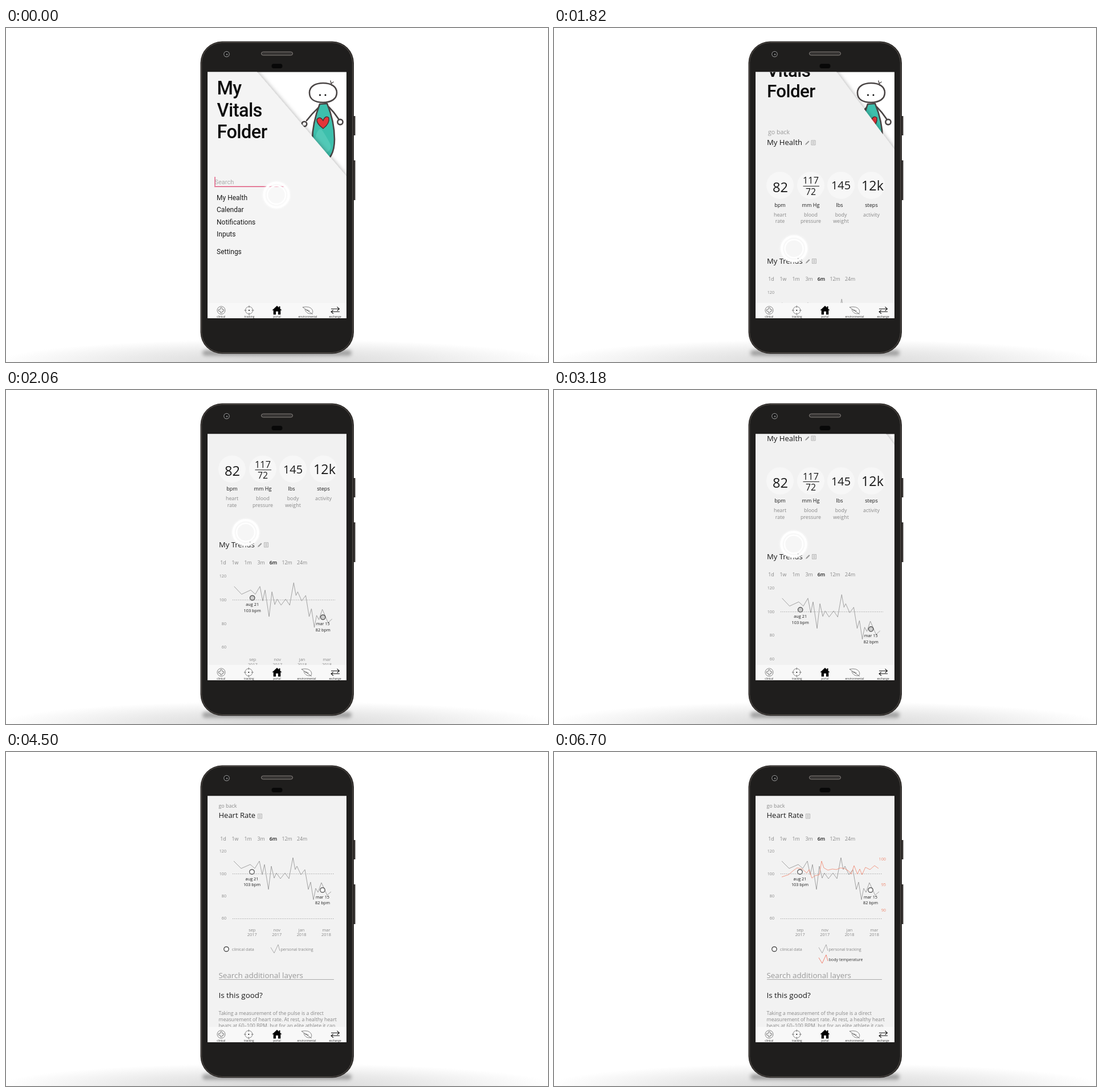
These frames come from a looping animation (952x588 px, 8000 ms). An HTML page:

```html
<!DOCTYPE html>
<html lang="en">
<head>
<meta charset="utf-8">
<title>Health app demo</title>
<style>
  html, body { margin: 0; width: 100%; height: 100%; overflow: hidden; background: #fff; }
  svg { display: block; width: 952px; height: 588px; font-family: "Open Sans", "Noto Sans", sans-serif; }
  .din { font-family: Roboto, sans-serif; }
  .line { fill: none; stroke: #8d8d8d; stroke-width: .8; }
  .icon { fill: none; stroke: #555; stroke-width: .7; }
  .ink { fill: none; stroke: #4a4545; stroke-width: 2.6; stroke-linecap: round; stroke-linejoin: round; }
  .dots { stroke: #888; stroke-width: .8; stroke-dasharray: 1.3 1.9; }
</style>
</head>
<body>
<svg viewBox="0 0 952 588">
  <defs>
    <clipPath id="screen"><rect x="354" y="77.500" width="244" height="433.500"/></clipPath>
    <filter id="fold" x="-20%" y="-20%" width="140%" height="140%">
      <feDropShadow dx="1.500" dy="-1" stdDeviation="3" flood-opacity=".25"/>
    </filter>
    <filter id="soft" x="-30%" y="-200%" width="160%" height="500%"><feGaussianBlur stdDeviation="3"/></filter>
    <filter id="glow" x="-30%" y="-30%" width="160%" height="160%"><feGaussianBlur stdDeviation="1.5"/></filter>
    <radialGradient id="floor">
      <stop offset="0" stop-color="#bbb"/><stop offset=".55" stop-color="#ddd"/><stop offset="1" stop-color="#fff"/>
    </radialGradient>
  </defs>

  <ellipse cx="476" cy="588" rx="490" ry="40" fill="url(#floor)" opacity=".6"/>
  <rect x="345" y="567" width="262" height="10" rx="5" fill="#666" opacity=".55" filter="url(#soft)"/>

  <g id="phone">
    <path d="M611 155h2.500v34H611zM611 233h2.500v70H611z" fill="#35312f"/>
    <rect x="341.500" y="23.500" width="269.500" height="550" rx="38" fill="#2b2826"/>
    <rect x="343.500" y="25.500" width="265" height="546" rx="36" fill="#1f1e1d" stroke="#55504c"/>
    <circle cx="387.500" cy="46" r="4.700" fill="#111" stroke="#8a8a8a" stroke-width="1.200"/>
    <circle cx="388" cy="46.500" r="1.800" fill="#666"/>
    <rect x="448.500" y="42" width="55" height="6" rx="3" fill="#353332" stroke="#85807c"/>
    <rect x="466.500" y="63" width="19" height="8" rx="4" fill="#080808"/>
  </g>

  <g clip-path="url(#screen)">
    <rect x="354" y="77" width="244" height="435" fill="#fff"/>
    <g id="figure">
      <path class="ink" d="M549 140Q537 151 528 163M567 139Q577 149 584 160M555 233L557 258M565 232L567 255"/>
      <circle class="ink" cx="524" cy="169" r="4.300"/>
      <circle class="ink" cx="587" cy="165.500" r="4.600"/>
      <circle class="ink" cx="556" cy="262" r="4"/>
      <ellipse class="ink" cx="568.500" cy="260.500" rx="5" ry="4.300"/>
      <path class="ink" style="fill:#3dbfac" d="M551 134C543 155 538 175 538 198C538 222 547 234 557 234C568 234 577 220 577 196C577 172 571 150 564 133Z"/>
      <path d="M544 190Q550 172 556 181T569 203T553 224T544 190" fill="#62d0bf" opacity=".6"/>
      <path d="M557 177Q545 168 546 161Q551 154 557 163Q561 153 567 158Q569 168 557 177Z" fill="#e5343a" stroke="#4a3535" stroke-width="1.500"/>
      <path class="ink" style="fill:#fff" d="M533 114C533 103 543 97 557 97S581 103 581 114S571 131 557 131S533 126 533 114Z"/>
      <path class="ink" style="stroke-width:1.400" d="M572 101L570 93M571 98L575 95"/>
      <circle cx="551.500" cy="118" r="1.500"/><circle cx="561" cy="118" r="1.500"/>
    </g>
    <g id="menu"></g>
    <g id="health"></g>
    <g id="heartRate"></g>
    <g id="nav"></g>
    <g id="touch">
      <circle r="22" fill="none" stroke="#fff" stroke-width="5" opacity=".7" filter="url(#glow)"/>
      <circle r="21.500" fill="#fff" fill-opacity=".35" stroke="#fff" stroke-width="3.800"/>
      <circle r="16" fill="none" stroke="#fff" stroke-width="2.500"/>
    </g>
  </g>
</svg>

<script>
const $ = id => document.getElementById(id);
const GREY = '#888', DARK = '#1a1a1a';

const text = (x, y, label, size, fill = DARK, extra = '') =>
  `<text x="${x}" y="${y}" font-size="${size}" fill="${fill}" ${extra}>${label}</text>`;
const centred = (x, y, label, size, fill = DARK, extra = '') =>
  text(x, y, label, size, fill, `text-anchor="middle" ${extra}`);
const title = (x, y, step, size) => ['My', 'Vitals', 'Folder'].map((word, i) =>
  text(x, y + i * step, word, size, '#0d0d0d', 'class="din" font-weight="500" letter-spacing="-.6"')).join('');
const pencil = (x, y) => `<path d="M${x} ${y + 4}l1-2.500 5-5 1.500 1.500-5 5z" fill="#999"/>`;
const list = (x, y) => `<path class="icon" style="stroke:#999" d="M${x} ${y - 4}h7v8h-7zM${x + 1.5} ${y - 2}h4m-4 2h4m-4 2h4"/>`;
const tabs = y => ['1d', '1w', '1m', '3m', '6m', '12m', '24m'].map((label, i) =>
  centred([381.5, 402.5, 425, 448, 469.5, 493.5, 520][i], y, label, 8.8,
    label === '6m' ? DARK : GREY, label === '6m' ? 'font-weight="600"' : '')).join('');

const pulse = '400,192 413,205 429,198 437,205 445,192 450,216 454,198 461,242 466,201 471,222 475,213 482,223 490,213 497,223 504,186 508,207 511,201 518,216 525,207 531,242 535,229 540,260 544,240 548,247 554,230 564,252 571,246';
const temperature = '400,220 412,216 420,209 427,204 436,206 444,213 448,207 453,222 458,218 466,216 470,192 474,204 481,208 489,206 496,207 503,204 510,205 517,209 522,215 527,200 533,215 537,206 541,216 547,203 555,207 563,200 570,205';

// Chart whose "100" line lies at y; k is the vertical scale.
function chart(y, k, pointFill, monthY, floorLine) {
  const dx = k > 1 ? 1 : 0;
  const axis = [120, 100, 80, 60].map((n, i) =>
    text(387, y + 2.5 + (i - 1) * 39.4 * k, n, 7.2, GREY, 'text-anchor="end"')).join('');
  const dotted = [0, ...(floorLine ? [79] : [])].map(d =>
    `<path class="dots" d="M398 ${y + d + .5}H${577 + dx}"/>`).join('');
  const marker = (x, d, day, rate) =>
    `<circle cx="${x + dx * .7}" cy="${y + d * k}" r="4.200" fill="${pointFill}" stroke="#444" stroke-width="1.200"/>` +
    centred(x + dx * .7, y + d * k + 14.5, day, 7.3) + centred(x + dx * .7, y + d * k + 24.8, rate, 7.3);
  const months = ['sep', 'nov', 'jan', 'mar'].map((m, i) => {
    const x = 432.3 + i * 43.4 + dx;
    return centred(x, monthY, m, 7.4, GREY) + centred(x, monthY + 8.5, i < 2 ? 2017 : 2018, 7.4, GREY);
  }).join('');
  return axis + dotted +
    `<polyline class="line" vector-effect="non-scaling-stroke" points="${pulse}" transform="translate(${-1.7 * dx} ${y - 214 * k}) scale(${1 + dx * .006} ${k})"/>` +
    marker(432, -3, 'aug 21', '103 bpm') + marker(556, 29, 'mar 15', '82 bpm') + months;
}

$('menu').innerHTML =
  '<path d="M340 60H426L620 287V530H340Z" fill="#f4f4f4" filter="url(#fold)"/>' +
  title(370.5, 117, 38.7, 32.5) +
  '<g class="din">' + text(366.5, 274.5, 'Search', 11, '#aaa') +
  ['My Health', 'Calendar', 'Notifications', 'Inputs', 'Settings'].map((label, i) =>
    text(370, [302.5, 324, 345.5, 367, 398][i], label, 12)).join('') + '</g>' +
  '<path d="M366 279.300H488M367 262V278" stroke="#e0587e" stroke-width="1.400"/>';

const stat = (x, unit, ...notes) =>
  `<circle cx="${x}" cy="372" r="24" fill="#f7f7f7"/>` + centred(x, 410, unit, 9.1) +
  notes.map((n, i) => centred(x, 427 + i * 11.5, n, 8.9, GREY)).join('');

$('health').innerHTML =
  '<path d="M340 -40H338L612 328V900H340Z" fill="#f1f1f1" filter="url(#fold)"/>' +
  title(374, 144, 36.6, 31.3) +
  text(376, 282, 'go back', 10.6, '#999') +
  text(374, 301.5, 'My Health', 13.1) + pencil(441, 297) + list(452, 297) +
  stat(397, 'bpm', 'heart', 'rate') + stat(451, 'mm Hg', 'blood', 'pressure') +
  stat(504, '', 'body', 'weight') + centred(501.5, 410, 'lbs', 9.1) + stat(557.5, 'steps', 'activity') +
  centred(397.5, 384, '82', 23.6) + centred(451, 369.5, '117', 16.3) + centred(451, 389, '72', 15.9) +
  '<path d="M437.500 373.500H466" stroke="#222"/>' +
  centred(504, 379.5, '145', 19.9) + centred(559.5, 381, '12k', 23.4) +
  text(374, 510, 'My Trends', 13) + pencil(442, 505.5) + list(453.5, 505.5) +
  tabs(540) + chart(602, 1.063, '#ccc', 710, false);

const zigzag = (y, stroke) => `<path class="line" style="stroke:${stroke}" d="M465 ${y - 3}l6 10 7-15 3 11"/>`;

$('heartRate').innerHTML =
  '<rect x="354" y="77" width="244" height="435" fill="#f2f2f2"/>' +
  text(373.5, 97.5, 'go back', 8.9, GREY) + text(373.5, 116, 'Heart Rate', 13) + list(442.5, 113) +
  tabs(156) + chart(214, 1, '#fff', 315.8, true) +
  '<circle cx="387" cy="347" r="4.200" fill="#fff" stroke="#333" stroke-width="1.200"/>' +
  text(397, 349.5, 'clinical data', 7.1, GREY) + zigzag(347, '#999') + text(482.5, 349.5, 'personal tracking', 7.1, GREY) +
  text(373.5, 397.5, 'Search additional layers', 13.4, '#999') +
  '<path d="M374 400.500H576" stroke="#aaa"/>' +
  text(373.5, 432.5, 'Is this good?', 13.4) +
  ['Taking a measurement of the pulse is a direct', 'measurement of heart rate. At rest, a healthy heart',
    'beats at 60–100 BPM, but for an elite athlete it can'].map((s, i) => text(373.5, 463.3 + i * 10.8, s, 8.75, GREY)).join('') +
  `<g id="layer"><polyline class="line" style="stroke:#f0846c" points="${temperature}"/>` +
  [100, 95, 90].map((n, i) => text(583, 190.5 + i * 45, n, 7.3, '#ee8a72', 'text-anchor="end"')).join('') +
  zigzag(365, '#f06a55') + text(482.5, 367.5, 'body temperature', 7.1, '#333') + '</g>';

$('nav').innerHTML =
  '<rect x="354" y="484" width="244" height="28" fill="#f8f8f8"/>' +
  '<circle class="icon" cx="378" cy="497" r="7"/>' +
  '<path class="icon" d="M376.500 492.500h3v3h3v3h-3v3h-3v-3h-3v-3h3z"/>' +
  '<g id="tracking"><circle class="icon" cx="427" cy="497" r="6.500"/><circle cx="427" cy="497" r="1"/>' +
  '<path class="icon" d="M427 488.500v4M427 501.500v4M418.500 497h4M431.500 497h4"/>' + centred(427.5, 509.5, 'tracking', 4.8, '#333') + '</g>' +
  '<path d="M467.500 497L476 489L479.500 492.300V490H481.500V494.200L484.500 497H482.300V504.500H478V499H474V504.500H469.700V497Z"/>' +
  '<g id="leaf"><path class="icon" d="M521 491.500Q534 489 538 496Q540 501 537 503Q527 504 525 495M521 491.500L539 504M527 495l2 3 1-2 2 3 1-2"/>' +
  centred(530, 509.5, 'environmental', 4.85, '#333') + '</g>' +
  '<path d="M571 494.500H585M581.500 491L585.500 494.500L581.500 498M586 499.500H571.500M575 496.500L571 499.500L575 503" fill="none" stroke="#222" stroke-width="1.100"/>' +
  centred(377.7, 509.5, 'clinical', 4.8, '#333') + centred(476, 509.5, 'portal', 4.8, '#333') + centred(578, 509.5, 'exchange', 4.8, '#333');

const show = (id, on) => $(id).setAttribute('display', on ? 'inline' : 'none');
const move = (id, x, y) => $(id).setAttribute('transform', `translate(${x} ${y})`);

// Scroll advances in 40 ms steps: a decelerating drag down, then one back up.
function scrollAt(t) {
  if (t < 1700) return 0;
  if (t < 3180) {
    const k = Math.min(12, Math.floor((t - 1700) / 40));
    return 34.6 * k - .97 * k * k;
  }
  const k = Math.min(3, Math.floor((t - 3180) / 40));
  return 212 - 48.5 * k + 3.5 * k * k;
}

function touchAt(t, scroll) {
  if (t < 1000) return [475, 294];
  if (t < 1500) return [396, 294];
  if (t < 1700) return [475, 294];
  if (t < 3500) return [t < 3180 ? 422 - scroll / 250 : 421 - (212 - scroll) / 38, 483.5 - scroll];
  if (t < 4500) return [397, 308];
  if (t >= 6500 && t < 6700) return [400, 394];
  return null;
}

function draw() {
  const t = performance.now() % 8000;
  const scroll = scrollAt(t), touch = touchAt(t, scroll);
  show('menu', t < 1500);
  show('health', t >= 1500 && t < 4500);
  show('heartRate', t >= 4500);
  show('layer', t >= 6700);
  show('touch', touch);
  move('health', 0, -scroll);
  move('leaf', t < 1500 ? 0 : -2, 0);
  move('tracking', t < 1500 ? 0 : -.7, 0);
  if (touch) move('touch', ...touch);
  requestAnimationFrame(draw);
}
draw();
</script>
</body>
</html>
```
